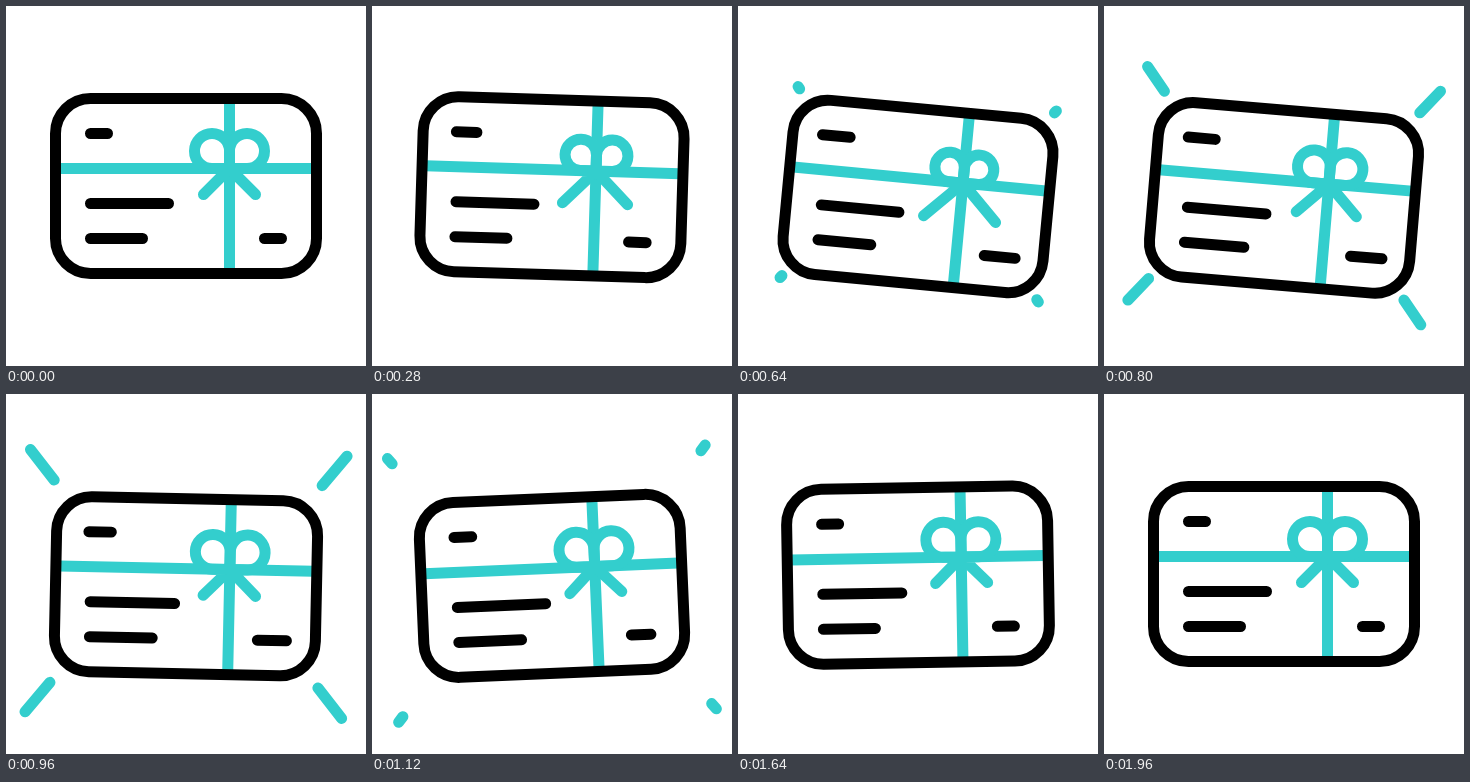
These frames come from a looping animation (360x360 px, 2 s). An HTML page:

```html
<!DOCTYPE html>
<html lang="en">
<head>
<meta charset="utf-8">
<title>Gift card</title>
<style>
  html, body { margin: 0; width: 100%; height: 100%; overflow: hidden; background: #fff; }
  svg { display: block; width: 100vw; height: 100vh; }
  path, rect { fill: none; stroke-width: 11; stroke-linecap: round; stroke-linejoin: round; }
  .teal { stroke: #33cecd; }
  .ink { stroke: #000; }
  .flat { stroke-linecap: butt; }
</style>
</head>
<body>
<svg viewBox="0 0 360 360">
  <g id="card">
    <path id="rays" class="teal"/>
    <path class="teal flat" d="M-127 -17.5H127M43.5 -84V84"/>
    <path id="bow" class="teal" transform="translate(43.5 -17.5)"/>
    <rect class="ink" x="-130.5" y="-87.5" width="261" height="175" rx="35"/>
    <path id="lines" class="ink"/>
  </g>
</svg>
<script>
const LOOP = 2000, STEP = 40;
const [card, rays, bow, lines] = ['card', 'rays', 'bow', 'lines'].map(id => document.getElementById(id));

// cubic-bezier(2/3, 0, 1/3, 1)
function ease(x) {
  x = Math.min(1, Math.max(0, x));
  let s = x;
  for (let i = 0; i < 6; i++) s -= (2 * s - 3 * s * s + 2 * s ** 3 - x) / (2 - 6 * s + 6 * s * s);
  return s * s * (3 - 2 * s);
}
const ramp = (t, from, to) => ease((t - from) / (to - from));
const pulse = (t, from, peak, to) => t < peak ? ramp(t, from, peak) : 1 - ramp(t, peak, to);
const mix = (a, b, k) => a + (b - a) * k;
const segment = (x1, x2, y) => `M${x1} ${y}H${x2}`;

function drawRays(t) {
  const head = ramp(t, 520, 1040), tail = ramp(t, 760, 1300);
  const point = (sx, sy, k) => `${sx * mix(128, 159, k)} ${sy * mix(93.8, 132, k) - 2.2}`;
  const visible = t >= 540 && tail < 0.985;
  rays.setAttribute('d', visible
    ? [[-1, -1], [1, -1], [-1, 1], [1, 1]]
        .map(([sx, sy]) => `M${point(sx, sy, tail)}L${point(sx, sy, head)}`).join('')
    : '');
}

function drawBow(t) {
  const pull = pulse(t, 0, 520, 1040);
  const r = 17.5 - 2.9 * pull, tip = 26 + 10.8 * pull;
  const loop = side => `M0 0V${-r}A${r} ${r} 0 1 ${side < 0 ? 0 : 1} ${side * r} 0Z`;
  bow.setAttribute('d', `${loop(-1)}${loop(1)}M${-tip} ${tip}L0 0L${tip} ${tip}`);
}

function drawLines(t) {
  const top = 8.5 + 5.4 * pulse(t, 0, 640, 1280);
  const corner = 8.5 + 7.3 * pulse(t, 160, 760, 1320);
  const long = 10.8 * pulse(t, 640, 1240, 1800);
  const short = 11 * pulse(t, 480, 1040, 1600);
  lines.setAttribute('d',
    segment(-87 - top, -87 + top, -52.5) +
    segment(-95.5, -17.5 + long, 17.5) +
    segment(-95.5, -43.5 + short, 52.5) +
    segment(87 - corner, 87 + corner, 52.5));
}

function draw(t) {
  const drop = 12.2 * pulse(t, 0, 960, 1920);
  const angle = t < 640
    ? 5.4 * ramp(t, 0, 640)
    : mix(mix(5.4, -3, ramp(t, 640, 1280)), 0, ramp(t, 1280, 1920));
  card.setAttribute('transform', `translate(180 ${180 + drop}) rotate(${angle})`);
  drawRays(t);
  drawBow(t);
  drawLines(t);
}

const start = performance.now();
function tick() {
  const t = (performance.now() - start) % LOOP;
  draw(Math.floor(t / STEP) * STEP);
  requestAnimationFrame(tick);
}
tick();
</script>
</body>
</html>
```
